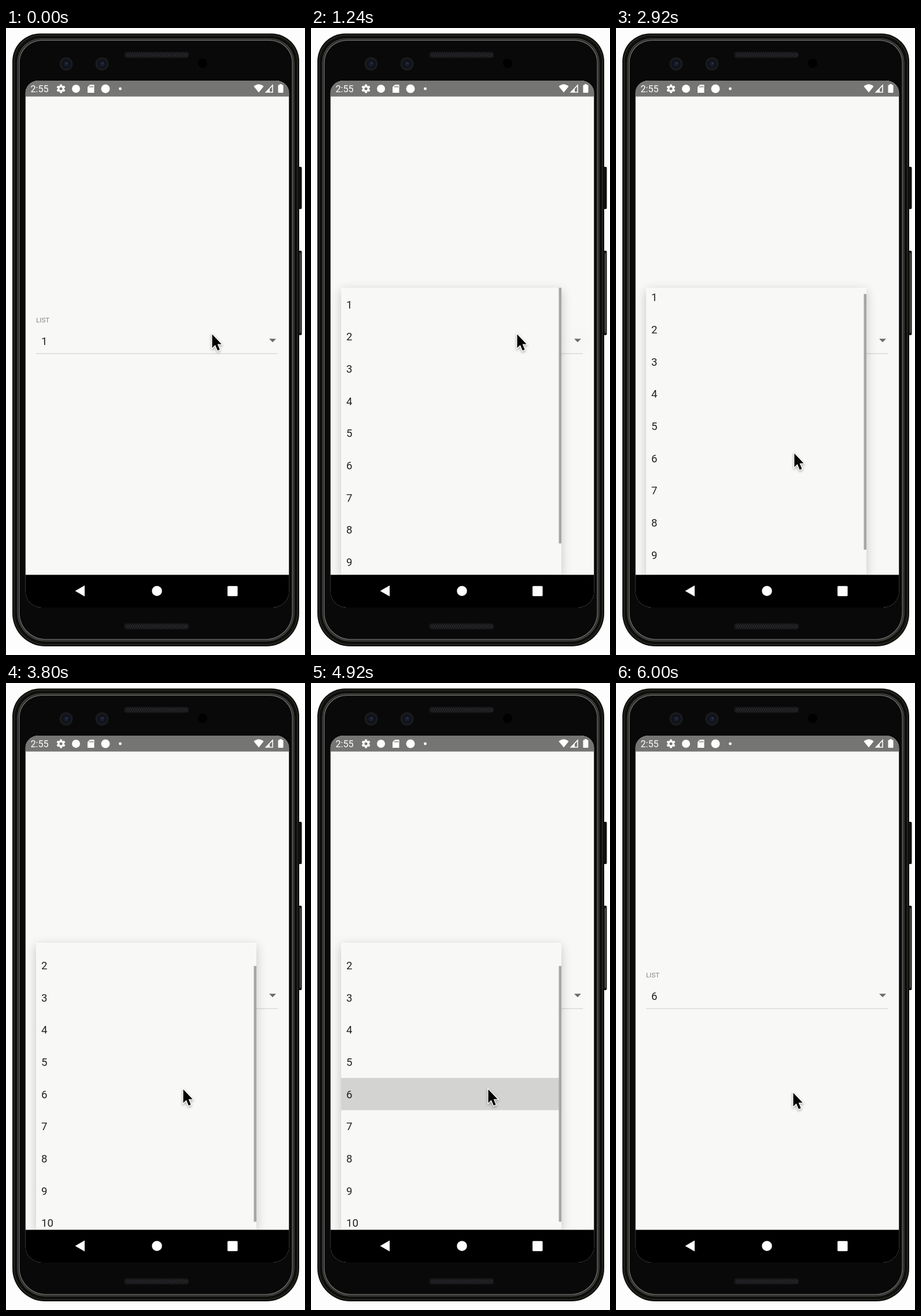
An HTML page with a canvas that plays this animation: 517 by 1084 pixels, repeating every 6100 ms.

```html
<!DOCTYPE html>
<html lang="en">
<head>
<meta charset="utf-8">
<title>Phone dropdown</title>
<style>
html, body { margin: 0; width: 100%; height: 100%; overflow: hidden; background: #fdfdfd; }
canvas { display: block; width: 517px; height: 1084px; }
</style>
</head>
<body>
<canvas id="stage"></canvas>
<script>
const W = 517, H = 1084, LOOP = 6100;
const canvas = document.getElementById('stage');
const dpr = window.devicePixelRatio || 1;
canvas.width = W * dpr;
canvas.height = H * dpr;
const c = canvas.getContext('2d');

const SCREEN = { x: 33.5, y: 91, w: 456, h: 911 };
const POPUP = { x: 52, y: 449, w: 381, h: 496 };
const SURFACE = '#f8f8f7';
const ROW = 55.65;
const OPEN = 760, PRESS = 4444, RELEASE = 4970, GONE = 5285;
const DRAG_FROM = 2650, DRAG_TO = 3300;

// time, x, y of the pointer tip
const PATH = [
  [1300, 356, 528], [2000, 316, 717], [2250, 316, 717], [DRAG_FROM, 309, 754],
  [DRAG_TO, 306, 701], [4960, 306, 701], [5160, 306, 707]
];

const clamp = (v, a = 0, b = 1) => Math.min(b, Math.max(a, v));
const lerp = (a, b, u) => a + (b - a) * u;
const span = (t, a, b) => clamp((t - a) / (b - a));
const smooth = u => u * u * (3 - 2 * u);

function box(x, y, w, h, r, fill) {
  c.beginPath();
  c.roundRect(x, y, w, h, r);
  c.fillStyle = fill;
  c.fill();
}

function disc(x, y, r, fill) {
  c.beginPath();
  c.arc(x, y, r, 0, Math.PI * 2);
  c.fillStyle = fill;
  c.fill();
}

function poly(points, fill) {
  c.beginPath();
  points.forEach(p => c.lineTo(p[0], p[1]));
  c.closePath();
  c.fillStyle = fill;
  c.fill();
}

function text(s, x, y, size, color) {
  c.font = `${size}px Roboto, "Noto Sans", sans-serif`;
  c.fillStyle = color;
  c.fillText(s, x, y);
}

function pointerAt(t) {
  if (t <= PATH[0][0]) return { x: PATH[0][1], y: PATH[0][2] };
  for (let i = 1; i < PATH.length; i++) {
    const a = PATH[i - 1], b = PATH[i];
    if (t <= b[0]) {
      const u = smooth(span(t, a[0], b[0]));
      return { x: lerp(a[1], b[1], u), y: lerp(a[2], b[2], u) };
    }
  }
  const end = PATH[PATH.length - 1];
  return { x: end[1], y: end[2] };
}

// The list follows the finger once past the touch slop.
function scrollAt(t) {
  if (t < DRAG_FROM) return 0;
  return Math.max(0, 746.2 - pointerAt(Math.min(t, DRAG_TO)).y);
}

function speaker(y) {
  box(204, y, 112, 11, 5, '#151517');
  c.strokeStyle = '#2b2b2e';
  c.lineWidth = 1;
  c.beginPath();
  for (let x = 207; x < 312; x += 4) {
    c.moveTo(x, y + 2);
    c.lineTo(x + 4, y + 9);
    c.moveTo(x + 4, y + 2);
    c.lineTo(x, y + 9);
  }
  c.stroke();
}

function camera(x, y) {
  disc(x, y, 11.5, '#1a1b1e');
  disc(x, y, 8, '#101218');
  disc(x, y, 4.5, '#171c30');
  disc(x + 1, y - 1, 1.5, '#33363e');
}

// One layer of the case, inset evenly from its outer edge.
function shell(inset, fill) {
  const top = 48 - inset * 0.8, bottom = 57 - inset * 0.9;
  box(11 + inset, 9.5 + inset, 496 - 2 * inset, 1059.5 - 2 * inset, [top, top, bottom, bottom], fill);
}

function drawBody() {
  box(503, 240, 8.5, 73, 2, '#101010');
  box(503, 385, 8.5, 146, 2, '#161616');
  box(508, 389, 1.5, 138, 1, '#66665f');
  shell(0, '#0c0c0a');
  shell(2, '#24241f');
  shell(4, '#0e0e0c');
  shell(8.5, '#484846');
  shell(10, '#141412');
  shell(11, '#6a6a68');
  shell(12.5, '#09090a');
  speaker(41);
  speaker(1029);
  camera(104, 62);
  camera(166, 62);
  disc(340, 61, 8, '#000');
}

function gear(x, y) {
  c.save();
  c.translate(x, y);
  for (let i = 0; i < 6; i++) {
    box(-2, -7.6, 4, 5, 0.8, '#fff');
    c.rotate(Math.PI / 3);
  }
  c.restore();
  disc(x, y, 5.6, '#fff');
  disc(x, y, 2.5, '#757575');
}

function drawStatus() {
  c.fillStyle = '#757573';
  c.fillRect(SCREEN.x, SCREEN.y, SCREEN.w, 27.5);
  text('2:55', 42.5, 111, 16.2, '#fff');
  gear(95, 105);
  disc(121, 105, 7, '#fff');
  // memory card
  poly([[145, 98], [152.5, 98], [152.5, 112], [141, 112], [141, 102]], '#fff');
  for (let x = 144.5; x < 151; x += 2.5) {
    c.fillStyle = '#757575';
    c.fillRect(x, 100, 1.2, 3);
  }
  disc(172, 105, 7.5, '#fff');
  disc(197.5, 105, 2.4, '#fff');
  // wifi
  c.beginPath();
  c.moveTo(437, 111.5);
  c.lineTo(428.5, 101);
  c.quadraticCurveTo(437, 93.5, 445.5, 101);
  c.closePath();
  c.fillStyle = '#fff';
  c.fill();
  // signal
  c.beginPath();
  c.moveTo(461, 99);
  c.lineTo(461, 111);
  c.lineTo(449.5, 111);
  c.closePath();
  c.strokeStyle = '#fff';
  c.lineWidth = 1.6;
  c.stroke();
  poly([[456, 104.5], [456, 111], [449.5, 111]], '#fff');
  // battery
  box(470.5, 98.5, 9, 13.5, 1, '#fff');
  box(473, 97, 4, 2, 0, '#fff');
}

function drawNav() {
  c.fillStyle = '#000';
  c.fillRect(SCREEN.x, 945.4, SCREEN.w, 57);
  poly([[119.5, 973.2], [136, 963.7], [136, 982.7]], '#fff');
  disc(261, 973.2, 8.7, '#fff');
  box(383, 964.8, 17.5, 17.5, 1.5, '#fff');
}

function drawField(t) {
  text('LIST', 52, 508.7, 11.6, '#85858a');
  text(t < RELEASE ? '1' : '6', 61, 547.5, 18.57, '#212121');
  c.fillStyle = '#cfcfc9';
  c.fillRect(52, 562.4, 418, 1.1);
  const grow = span(t, 690, 840), fade = 1 - span(t, 900, 1250);
  if (grow > 0 && fade > 0) {
    disc(461, 540, lerp(6, 22.5, smooth(grow)), `rgba(0,0,0,${0.17 * fade * grow})`);
  }
  poly([[455, 537.2], [467, 537.2], [461, 543.2]], '#6c6c64');
}

function drawRipple(t, scroll) {
  if (t < PRESS) return;
  const u = span(t, PRESS, PRESS + 225);
  const top = POPUP.y + 5 * ROW - scroll + 0.8;
  const fade = 1 - span(t, RELEASE, GONE);
  const x = lerp(242.5, pointerAt(t).x, Math.pow(1 - u, 3));
  const r = u < 1 ? 30 + 166 * u : 260;
  c.save();
  c.beginPath();
  c.rect(POPUP.x, top, POPUP.w, ROW);
  c.clip();
  disc(x, top + ROW / 2, r, `rgba(0,0,0,${0.15 * fade})`);
  c.restore();
}

function drawPopup(t) {
  if (t < OPEN || t >= GONE) return;
  const p = smooth(span(t, OPEN, OPEN + 250));
  const alpha = Math.min(span(t, OPEN, OPEN + 125), 1 - span(t, RELEASE, GONE));
  const h = lerp(45, POPUP.h, p);
  const top = POPUP.y + (POPUP.h - h) / 2;
  const scroll = scrollAt(t);

  c.save();
  c.translate(15.6 * (1 - p), -167 * (1 - p));
  c.globalAlpha = alpha;
  // the shadow stays visible through a translucent surface
  c.save();
  c.shadowColor = 'rgba(20,20,25,0.22)';
  c.shadowBlur = 18 * dpr;
  c.shadowOffsetY = 5 * dpr;
  box(POPUP.x, top, POPUP.w, h, 2, SURFACE);
  c.restore();

  c.beginPath();
  c.rect(POPUP.x, top, POPUP.w, h);
  c.clip();
  drawRipple(t, scroll);
  for (let i = 0; i < 10; i++) {
    text(String(i + 1), 61, POPUP.y + 35.6 + i * ROW - scroll, 18.57, '#212121');
  }
  const ratio = POPUP.h / (10 * ROW);
  c.fillStyle = '#a6a6a6';
  c.fillRect(428.5, POPUP.y + scroll * ratio, 4.5, POPUP.h * ratio);
  c.restore();
}

function drawPointer(t) {
  const { x, y } = pointerAt(t);
  c.save();
  c.translate(x, y);
  c.beginPath();
  [[0.5, 1.5], [0.5, 25], [5.8, 20], [9.8, 29.6], [13.6, 28], [9.6, 18.6], [16.6, 18.4]]
    .forEach(q => c.lineTo(q[0], q[1]));
  c.closePath();
  c.lineJoin = 'miter';
  c.shadowColor = 'rgba(0,0,0,0.35)';
  c.shadowBlur = 4 * dpr;
  c.shadowOffsetY = 2 * dpr;
  c.strokeStyle = '#fff';
  c.lineWidth = 2.6;
  c.stroke();
  c.shadowColor = 'transparent';
  c.fillStyle = '#000';
  c.fill();
  c.restore();
}

function draw(t) {
  c.setTransform(dpr, 0, 0, dpr, 0, 0);
  c.fillStyle = '#fdfdfd';
  c.fillRect(0, 0, W, H);
  drawBody();
  c.save();
  c.beginPath();
  c.roundRect(SCREEN.x, SCREEN.y, SCREEN.w, SCREEN.h, [22, 22, 28, 28]);
  c.clip();
  c.fillStyle = SURFACE;
  c.fillRect(SCREEN.x, SCREEN.y, SCREEN.w, SCREEN.h);
  drawField(t);
  drawPopup(t);
  drawStatus();
  drawNav();
  c.restore();
  drawPointer(t);
}

const start = performance.now();
function tick() {
  draw((performance.now() - start) % LOOP);
  requestAnimationFrame(tick);
}
tick();
</script>
</body>
</html>
```
